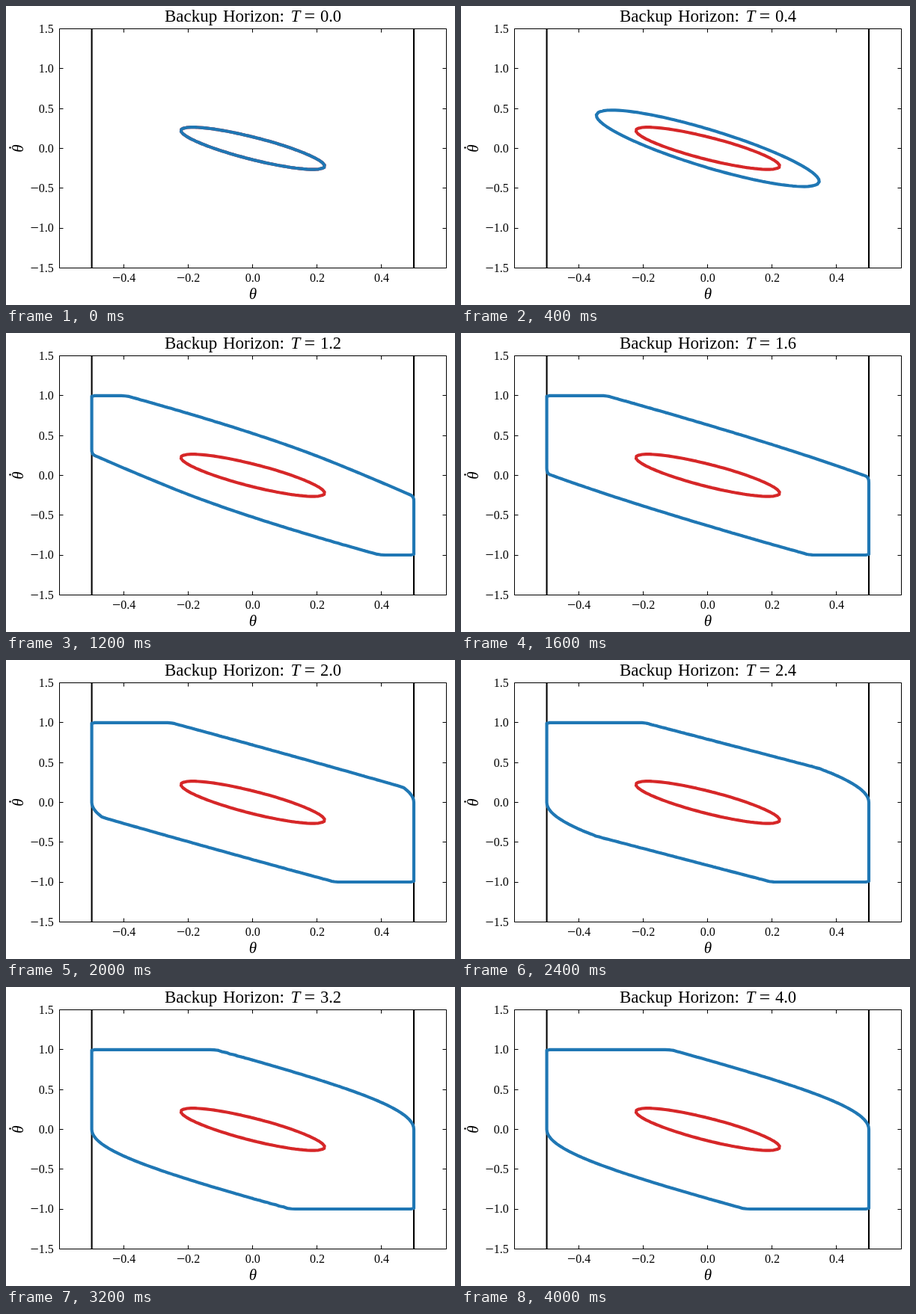
An HTML page that plays this animation: 600 px wide and 400 px high, repeating every 4100 ms.

```html
<!DOCTYPE html>
<html lang="en">
<head>
<meta charset="utf-8">
<title>Backup Horizon</title>
<style>
html, body { margin: 0; height: 100%; overflow: hidden; background: #fff; }
svg { display: block; font: 16px "Liberation Serif", serif; }
.title { font-size: 23px; }
.curve { fill: none; stroke-width: 4.17; stroke-linecap: round; }
i, .math { font-style: italic; }
</style>
</head>
<body>
<svg id="plot" width="600" height="400" viewBox="0 0 600 400">
  <g id="axes" stroke="#000" fill="none"></g>
  <g id="labels"></g>
  <path id="limits" stroke="#000" stroke-width="2.08"/>
  <path id="backup" class="curve" stroke="#d62728"/>
  <path id="reach" class="curve" stroke="#1f77b4"/>
  <path id="frame" fill="none" stroke="#000" d="M71.5 30.5H588.5V350.5H71.5Z"/>
  <g class="title">
    <text x="212" y="21" word-spacing="2">Backup Horizon:</text>
    <text x="380.5" y="21" class="math">T</text>
    <text x="398.5" y="22" font-size="26">=</text>
    <text id="horizon" x="448" y="21" text-anchor="end" font-size="22.5"></text>
  </g>
  <text x="330" y="391.5" class="math" font-size="21" text-anchor="middle">θ</text>
  <g transform="translate(22.5 190.5) rotate(-90)">
    <text class="math" font-size="21" text-anchor="middle">θ</text>
    <circle cx="1" cy="-17" r="1.3"/>
  </g>
</svg>
<script>
const $ = id => document.getElementById(id);
const px = x => 329.8 + 430.4 * x;
const py = y => 190.4 - 106.6 * y;
const snap = v => Math.floor(v) + 0.5;

// Axes
const label = (v, x, y, anchor) => {
  const minus = v < 0 ? '<tspan font-size="20" dy="1">−</tspan><tspan dy="-1">' : '<tspan>';
  return `<text x="${x}" y="${y}" text-anchor="${anchor}">${minus}${Math.abs(v).toFixed(1)}</tspan></text>`;
};
let ticks = '', labels = '';
for (let k = -2; k <= 2; k++) {
  const x = px(k / 5);
  ticks += `M${snap(x)} 30.5v5M${snap(x)} 350.5v-5`;
  labels += label(k / 5, x, 369.3, 'middle');
}
for (let k = -3; k <= 3; k++) {
  const y = py(k / 2);
  ticks += `M71.5 ${snap(y)}h5M588.5 ${snap(y)}h-5`;
  labels += label(k / 2, 63.7, y + 5.4, 'end');
}
$('axes').innerHTML = `<path d="${ticks}"/>`;
$('labels').innerHTML = labels;
$('limits').setAttribute('d', `M${px(-0.5)} 30.5V350.5M${px(0.5)} 30.5V350.5`);

// Inverted pendulum under saturated LQR feedback
const GAIN = 1 + Math.SQRT2;
const accel = (x, y) => Math.sin(x) - Math.max(-1, Math.min(1, GAIN * (x + y)));
const safety = (x, y) => Math.min(0.5 - Math.abs(x), 1 - Math.abs(y));
const terminal = (x, y) => 0.05 - GAIN * (Math.SQRT2 * x * x + 2 * x * y + y * y);

const N = 100, FRAMES = 41, SUBSTEPS = 4, DT = 0.1 / SUBSTEPS;
const gx = i => -0.6 + 1.2 * i / N;
const gy = j => -1.5 + 3 * j / N;
const states = [];
for (let j = 0; j <= N; j++)
  for (let i = 0; i <= N; i++)
    states.push({ x: gx(i), y: gy(j), safe: safety(gx(i), gy(j)) });

function advance(s) {
  for (let n = 0; n < SUBSTEPS; n++) {
    const mx = s.x + s.y * DT / 2, my = s.y + accel(s.x, s.y) * DT / 2;
    s.x += my * DT;
    s.y += accel(mx, my) * DT;
    s.safe = Math.min(s.safe, safety(s.x, s.y));
  }
}

// Zero level of the grid values, by marching squares
function contour(h) {
  let d = '';
  for (let j = 0; j < N; j++) for (let i = 0; i < N; i++) {
    const corners = [[i, j], [i + 1, j], [i + 1, j + 1], [i, j + 1]];
    const points = [];
    corners.forEach(([i0, j0], k) => {
      const [i1, j1] = corners[(k + 1) % 4];
      const a = h[j0 * (N + 1) + i0], b = h[j1 * (N + 1) + i1];
      if (a > 0 === b > 0) return;
      const f = a / (a - b);
      points.push(px(gx(i0 + f * (i1 - i0))).toFixed(2) + ' ' + py(gy(j0 + f * (j1 - j0))).toFixed(2));
    });
    for (let k = 0; k < points.length; k += 2) d += `M${points[k]}L${points[k + 1]}`;
  }
  return d;
}

const paths = [];
for (let k = 0; k < FRAMES; k++) {
  if (k) states.forEach(advance);
  paths.push(contour(states.map(s => Math.min(s.safe, terminal(s.x, s.y)))));
}
$('backup').setAttribute('d', paths[0]);

let shown = -1;
function draw() {
  const k = Math.floor(performance.now() / 100) % FRAMES;
  if (k !== shown) {
    shown = k;
    $('reach').setAttribute('d', paths[k]);
    $('horizon').textContent = (k / 10).toFixed(1);
  }
  requestAnimationFrame(draw);
}
draw();
</script>
</body>
</html>
```
